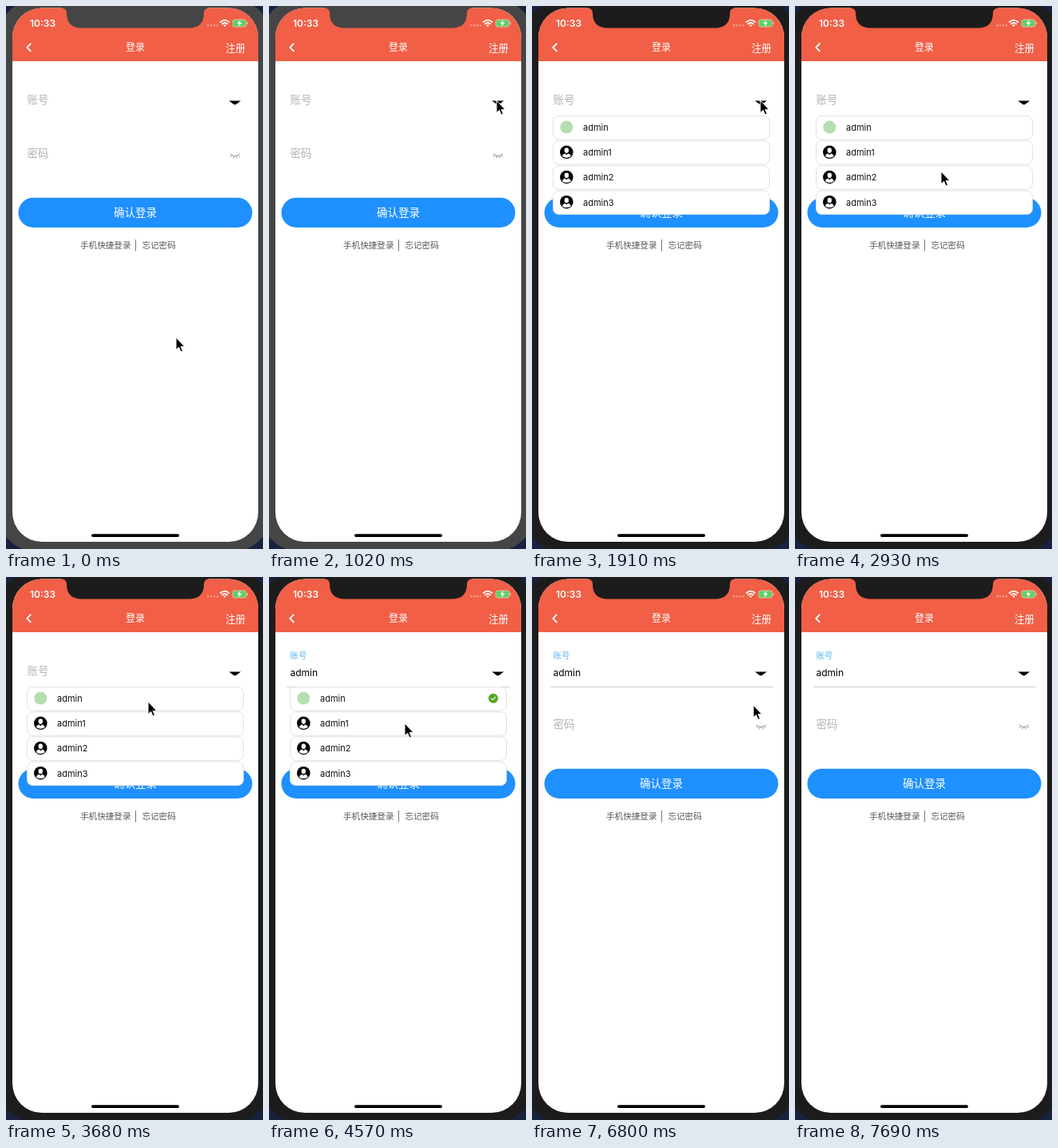
An HTML page for the animation above (8090 ms loop, 322 px wide and 679 px high).

```html
<!DOCTYPE html>
<html lang="zh-CN">
<head>
<meta charset="utf-8">
<title>登录</title>
<style>
  html, body { margin: 0; width: 100%; height: 100%; overflow: hidden; background: #17223f; }
  svg { display: block; width: 100vw; height: 100vh; }
  text { font-family: Inter, "Noto Sans CJK SC", "Noto Sans CJK", sans-serif; }
  .body { fill: #1c1c1c; }
  .idle .body { fill: #454545; }
  .white { fill: #fff; }
  .line { fill: none; stroke: #fff; stroke-linecap: round; stroke-linejoin: round; }
  .hint { fill: #b3b3b3; font-size: 13.4px; }
  .link { fill: #555; font-size: 10.6px; }
  .row { fill: #fff; stroke: #e2e2e2; }
  .name { fill: #111; font-size: 11px; }
</style>
</head>
<body>
<svg id="stage" viewBox="0 0 322 679" xmlns="http://www.w3.org/2000/svg">
  <defs>
    <clipPath id="screen"><rect x="8" y="2.5" width="308" height="667.5" rx="37"/></clipPath>
    <g id="person">
      <circle r="8.3"/>
      <ellipse class="white" cy="-2.2" rx="2.7" ry="3.3"/>
      <path class="white" d="M-5.4 5.2Q-5 2.2-1.8 1.6L0 3.4L1.8 1.6Q5 2.2 5.4 5.2Q0 8.6-5.4 5.2Z"/>
    </g>
  </defs>

  <rect class="body" x="-10" y="-8" width="342" height="690" rx="48"/>
  <g clip-path="url(#screen)">
    <rect class="white" width="322" height="679"/>
    <rect width="322" height="69" fill="#f05f46"/>
  </g>
  <path class="body" d="M70 0V2.5Q76 3 76 9Q76 27.5 95 27.5H229Q248 27.5 248 9Q248 3 254 2.5V0Z"/>

  <!-- status bar -->
  <text class="white" x="30" y="25.8" font-size="12" font-weight="600">10:33</text>
  <path d="M252 24.2H266" stroke="#fff" stroke-opacity=".4" stroke-width="2" stroke-dasharray="2.4 1.5"/>
  <path class="line" stroke-width="1.8" stroke-linecap="butt" d="M268.6 20Q274 15.2 279.4 20M270.9 22.3Q274 19.6 277.1 22.3"/>
  <path class="white" d="M274 26L272.2 24Q274 22.6 275.8 24Z"/>
  <rect x="284" y="17" width="17" height="9" rx="2.6" fill="#5ed065" stroke="#f7b9ae" stroke-width=".9"/>
  <path d="M302.4 20V23" stroke="#f7b9ae" stroke-width="1.3"/>
  <path class="white" d="M293.6 17.3L289.4 22H292L291.2 25.7L295.6 20.8H292.9Z"/>

  <!-- title bar -->
  <path class="line" stroke-width="1.9" d="M30.8 47.2L26.3 51.8L30.8 56.4"/>
  <text class="white" x="162" y="56.4" font-size="12" font-weight="500" text-anchor="middle">登录</text>
  <text class="white" x="275" y="56.6" font-size="12.6">注册</text>

  <!-- form -->
  <text id="label" class="hint" x="26.5">账号</text>
  <text id="value" x="26.5" y="124.2" font-size="12"></text>
  <path id="underline" d="M22.5 137.5H302" stroke="#cfcfcf"/>
  <path d="M279.3 118.5H294.2L288.2 122.9Q286.7 123.8 285.3 122.9Z"/>
  <text class="hint" x="26.5" y="188.8">密码</text>
  <path fill="none" stroke="#8a8a8a" d="M281 184.8Q287 190.6 293 184.8M282.6 187L281.2 188.8M285.4 188.2L284.8 190.4M288.6 188.2L289.2 190.4M291.4 187L292.8 188.8"/>
  <rect x="15.5" y="239.7" width="293" height="37.3" rx="18.6" fill="#1e90ff"/>
  <text class="white" x="162" y="263.2" font-size="13.5" text-anchor="middle">确认登录</text>
  <text class="link" x="93" y="303">手机快捷登录</text>
  <path d="M162.5 292V306.5" stroke="#777"/>
  <text class="link" x="170.4" y="303">忘记密码</text>

  <g id="list">
    <g id="rows"></g>
    <g id="check">
      <circle r="6" fill="#4fa61e"/>
      <path class="line" stroke-width="1.1" d="M-2.6 .2L-.7 2L2.7-1.6"/>
    </g>
  </g>

  <rect x="107" y="660.2" width="110" height="3.8" rx="1.9"/>
  <path id="cursor" d="M0 0V15.6L3.6 12.3L6 17.9L8.5 16.8L6.1 11.4H10.9Z" stroke="#fff" stroke-width="1" stroke-linejoin="round"/>
</svg>

<script>
const LOOP = 8090;
const FOCUS = 1470, OPEN = 1760, PICK_FIRST = 3830, PICK_SECOND = 4870, PICK_BACK = 5610, CLOSE = 6650, LEAVE = 7690;
const START = [213, 414.5];

// Pointer moves: first step, last step, step count, destination
const MOVES = [
  [440, 1020, 5, 285, 118],
  [1910, 1910, 1, 286, 118],
  [2200, 2930, 6, 183, 207],
  [3230, 3680, 4, 178, 156],
  [4420, 4570, 2, 170, 183],
  [5310, 5610, 3, 177, 155],
  [5910, 6350, 4, 283, 121],
  [6800, 7540, 6, 205, 651]
];

const $ = id => document.getElementById(id);
const mix = (a, b, p) => a + (b - a) * p;
const smooth = p => p * p * (3 - 2 * p);
const show = (id, on) => $(id).setAttribute("display", on ? "inline" : "none");
const rowY = i => 152 + 31.2 * i;

$("rows").innerHTML = ["admin", "admin1", "admin2", "admin3"].map((name, i) => {
  const y = rowY(i);
  const icon = i ? `<use href="#person" x="43.3" y="${y - .4}"/>` : `<circle cx="43.3" cy="${y - .4}" r="8" fill="#b5dfb0"/>`;
  return `<rect class="row" x="26.5" y="${y - 14.5}" width="271" height="29.5" rx="7"/>${icon}
    <text class="name" x="64" y="${y + 4}">${name}</text>`;
}).join("");

function pointerAt(t) {
  let [x, y] = START;
  for (const [first, last, count, toX, toY] of MOVES) {
    if (t < first) break;
    const gap = (last - first) / (count - 1) || 1;
    const step = Math.min(count, Math.floor((t - first) / gap + 1.001));
    const p = smooth(step / count);
    x = mix(x, toX, p);
    y = mix(y, toY, p);
  }
  return [x, y];
}

function draw(t) {
  const picked = t >= PICK_FIRST;
  const second = t >= PICK_SECOND && t < PICK_BACK;
  const float = !picked ? 0 : t < PICK_FIRST + 150 ? .5 : 1;

  $("stage").classList.toggle("idle", t < FOCUS);
  show("list", t >= OPEN && t < CLOSE);
  show("check", picked);
  show("underline", picked);
  show("cursor", t < LEAVE);

  $("value").textContent = picked ? (second ? "admin1" : "admin") : "";
  $("check").setAttribute("transform", `translate(281 ${rowY(second ? 1 : 0) - .3})`);

  const label = $("label");
  label.setAttribute("y", mix(121.8, 101.8, float));
  label.style.fontSize = mix(13.4, 10.4, float) + "px";
  label.style.fill = picked ? "#55b4f5" : "";

  $("cursor").setAttribute("transform", `translate(${pointerAt(t).join(" ")})`);
}

const begin = performance.now();
function tick() {
  draw((performance.now() - begin) % LOOP);
  requestAnimationFrame(tick);
}
tick();
</script>
</body>
</html>
```
